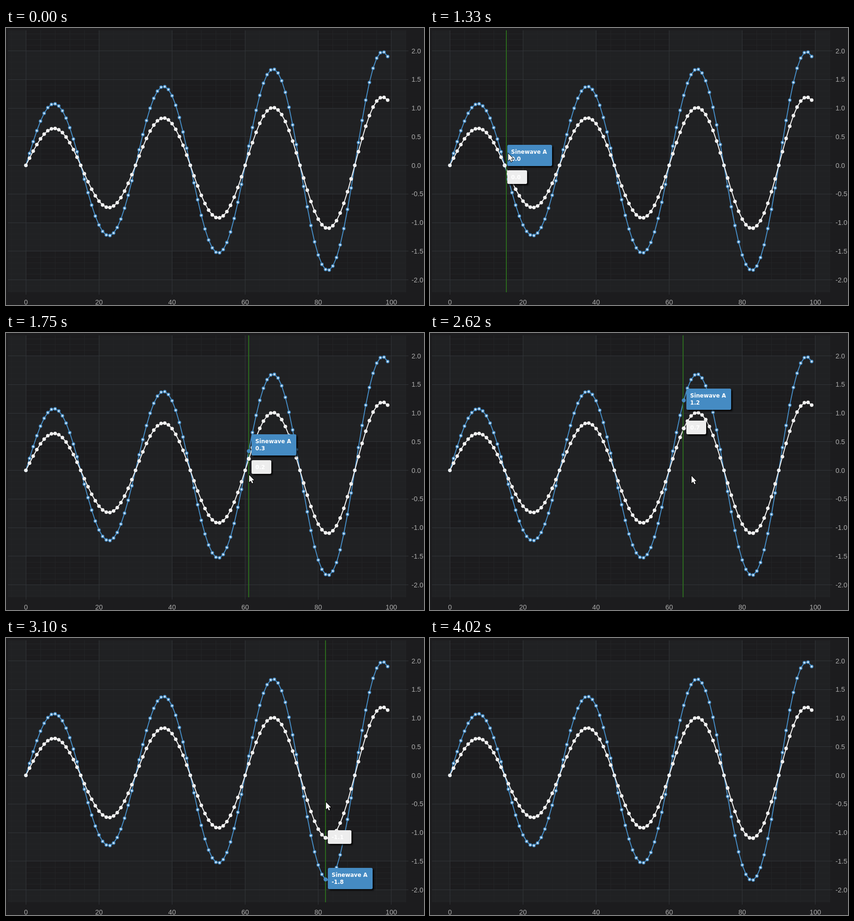
Animation of 887 by 588 pixels, one loop 4290 ms. Source, as an HTML page with a canvas:

```html
<!DOCTYPE html>
<html lang="en">
<head>
<meta charset="utf-8">
<title>Sine wave chart with rollover</title>
<style>
html, body { margin: 0; width: 100%; height: 100%; overflow: hidden; background: #1c1c1e; }
canvas { display: block; width: 887px; height: 588px; }
</style>
</head>
<body>
<canvas id="chart" width="887" height="588"></canvas>
<script>
const LOOP = 4290;
const PLOT = { left: 4, top: 5, right: 849, bottom: 561 };
const BLUE = '#458bc3', WHITE = '#f2f2f2';

const canvas = document.getElementById('chart');
const ctx = canvas.getContext('2d');

// Pointer states: start time, hovered index (-1 = none), line x, cursor x, cursor y
const STEPS = [
  [0, -1],
  [560, 12, 137, 140, 268],
  [680, 15, 162, 162, 264],
  [1080, 15, 162, 162, 265],
  [1330, 15, 162, 166, 266],
  [1480, 31, 282, 292, 281],
  [1630, 50, 430, 446, 296],
  [1750, 61, 515, 516, 301],
  [2620, 64, 537, 555, 303],
  [2740, 70, 585, 600, 316],
  [2860, 76, 632, 645, 332],
  [2980, 81, 668, 674, 344],
  [3100, 82, 678, 679, 348],
  [3630, 87, 716, 738, 446],
  [3750, 91, 748, 772, 519],
  [3870, 90, 740, 694, 574],
  [4020, -1]
];

const px = i => 42.2 + i * 7.755;
const py = v => 291.6 - v * 121.5;
const waveA = i => Math.sin(i * Math.PI / 15) * (1 + i / 99);
const waveB = i => waveA(i) * 0.6;

function rect(c, color, x, y, w, h) {
  c.fillStyle = color;
  c.fillRect(x, y, w, h);
}

function dot(c, x, y, r, color) {
  c.fillStyle = color;
  c.beginPath();
  c.arc(x, y, r, 0, Math.PI * 2);
  c.fill();
}

function drawBands(c) {
  const { left, top, right, bottom } = PLOT;
  c.save();
  c.beginPath();
  c.rect(left, top, right - left, bottom - top);
  c.clip();
  for (let v = -20; v <= 100; v += 40) {
    const x = Math.floor(px(v));
    rect(c, '#202123', x, top, Math.floor(px(v + 20)) - x, bottom - top);
  }
  for (let v = -2; v <= 2.5; v += 1) {
    const y = Math.floor(py(v));
    rect(c, '#202123', left, y, right - left, Math.floor(py(v - 0.5)) - y);
  }
  for (let v = -8; v <= 104; v += 4) {
    rect(c, '#232426', Math.floor(px(v)), top, 1, bottom - top);
  }
  for (let n = -22; n <= 23; n++) {
    rect(c, '#232426', left, Math.floor(py(n / 10)), right - left, 1);
  }
  c.restore();
}

function drawAxes(c) {
  c.font = '14.5px "Liberation Sans", Arial, sans-serif';
  const label = (text, x, y, align) => {
    c.fillStyle = '#acacac';
    c.textAlign = align;
    c.fillText(text, x, y);
  };
  for (let v = 0; v <= 100; v += 20) {
    rect(c, '#323539', Math.floor(px(v)), PLOT.top, 1, PLOT.bottom + 5 - PLOT.top);
    label(String(v), px(v), 587, 'center');
  }
  for (let v = -2; v <= 2; v += 0.5) {
    rect(c, '#323539', PLOT.left, Math.floor(py(v)), PLOT.right + 5 - PLOT.left, 1);
    label(v.toFixed(1), 860.5, py(v) + 5, 'left');
  }
}

function drawSeries(c, wave, color, marker) {
  c.strokeStyle = color;
  c.lineWidth = 2;
  c.lineJoin = 'round';
  c.beginPath();
  for (let i = 0; i < 100; i++) c.lineTo(px(i), py(wave(i)));
  c.stroke();
  for (let i = 0; i < 100; i++) marker(px(i), py(wave(i)));
}

function makeChart() {
  const layer = document.createElement('canvas');
  layer.width = canvas.width;
  layer.height = canvas.height;
  const c = layer.getContext('2d');
  rect(c, '#1c1c1e', 0, 0, layer.width, layer.height);
  drawBands(c);
  drawAxes(c);
  drawSeries(c, waveA, BLUE, (x, y) => {
    dot(c, x, y, 3.7, BLUE);
    dot(c, x, y, 1.9, '#dcebf7');
  });
  drawSeries(c, waveB, WHITE, (x, y) => dot(c, x, y, 3.8, WHITE));
  return layer;
}

function tooltip(x, y, w, h, color, lines) {
  ctx.save();
  ctx.shadowColor = 'rgba(0,0,0,0.8)';
  ctx.shadowOffsetX = ctx.shadowOffsetY = 3;
  ctx.shadowBlur = 3;
  ctx.fillStyle = color;
  ctx.beginPath();
  ctx.roundRect(x, y, w, h, 3);
  ctx.fill();
  ctx.restore();
  ctx.font = 'bold 11.7px "DejaVu Sans", Verdana, sans-serif';
  ctx.textAlign = 'left';
  ctx.fillStyle = '#fff';
  lines.forEach((text, n) => ctx.fillText(text, x + 8, y + 18.6 + n * 15.5));
}

const format = v => (Math.round(v * 10) / 10 + 0).toFixed(1);

function drawTooltips(i) {
  const a = waveA(i), b = waveB(i), x = Math.round(px(i) + 5.3);
  const hA = 45, hB = 29, gap = 9.5;
  let topA = py(a) - 2 - hA / 2, topB = py(b) - 2 - hB / 2;
  // Labels that would collide are stacked around their mean height
  if (topB < topA + hA + gap && topA < topB + hB + gap) {
    topA = (py(a) + py(b)) / 2 - 2 - (hA + gap + hB) / 2;
    topB = topA + hA + gap;
  }
  topA = Math.round(topA);
  topB = Math.round(topB);
  const textB = format(b);
  tooltip(x, topA, 95, hA, BLUE, ['Sinewave A', format(a)]);
  tooltip(x, topB, textB[0] === '-' ? 50 : 42, hB, '#ededed', [textB]);
}

function drawCursor(x, y) {
  const arrow = new Path2D('M0 0V15.2L3.6 11.9L6 17.6L8.4 16.6L6 11H10.6Z');
  ctx.save();
  ctx.translate(x, y + 0.5);
  ctx.lineWidth = 1.8;
  ctx.strokeStyle = '#000';
  ctx.stroke(arrow);
  ctx.fillStyle = '#fff';
  ctx.fill(arrow);
  ctx.restore();
}

const chart = makeChart();

function draw(t) {
  const [, i, lineX, cx, cy] = STEPS.findLast(s => s[0] <= t);
  ctx.drawImage(chart, 0, 0);
  if (i < 0) return;
  ctx.save();
  ctx.beginPath();
  ctx.rect(PLOT.left, PLOT.top, PLOT.right - PLOT.left, PLOT.bottom - PLOT.top);
  ctx.clip();
  rect(ctx, '#2b6a1d', lineX - 1, PLOT.top, 2, PLOT.bottom - PLOT.top);
  dot(ctx, px(i), py(waveA(i)), 4.2, BLUE);
  dot(ctx, px(i), py(waveB(i)), 4.2, WHITE);
  drawTooltips(i);
  ctx.restore();
  drawCursor(cx, cy);
}

const start = performance.now();
function tick() {
  draw((performance.now() - start) % LOOP);
  requestAnimationFrame(tick);
}
tick();
</script>
</body>
</html>
```
